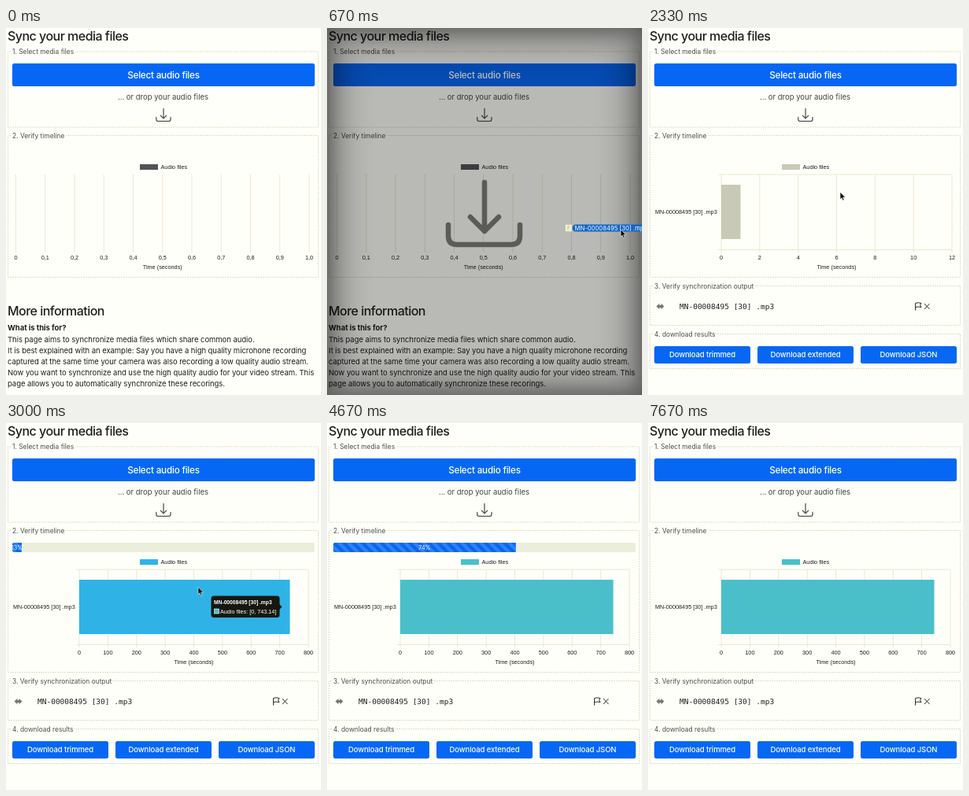
Recreate the animation shown at these times as an HTML page. Size 400 px wide and 466 px high, loop 8 s.

```html
<!DOCTYPE html>
<html lang="en">
<head>
<meta charset="utf-8">
<title>Sync your media files</title>
<style>
  html, body { margin: 0; width: 100%; height: 100%; overflow: hidden; background: #fffffa; }
  svg { display: block; width: 400px; height: 466px; font-family: Inter, sans-serif; fill: #1e1e1c; }
  text { white-space: pre; }
  .h { font-size: 16px; font-weight: 500; letter-spacing: -.52px; }
  .p { font-size: 9.5px; letter-spacing: -.05px; }
  .b { font-weight: 700; }
  .l { font-size: 8.4px; fill: #4c4c48; }
  .c { font: 7.3px "Liberation Sans", Arial, sans-serif; }
  .m { font: 9.5px "DejaVu Sans Mono", monospace; }
  .w { fill: #fff; }
  .line { fill: none; stroke: #2c2c28; }
</style>
</head>
<body>
<svg id="stage" viewBox="0 0 400 466"></svg>
<script>
const LOOP = 8000, STEP = 1000 / 3;
const FILE = 'MN-00008495 [30] .mp3';
const BLUE = '#0567f3', GRID = '#e9e9cc';
const INFO = [
  'This page aims to synchronize media files which share common audio.',
  'It is best explained with an example: Say you have a high quality microhone recording',
  'captured at the same time your camera was also recording a low quality audio stream.',
  'Now you want to synchronize and use the high quality audio for your video stream. This',
  'page allows you to automatically synchronize these recorings.'
];

const clamp = x => Math.max(0, Math.min(1, x));
const smooth = x => (x = clamp(x), x * x * (3 - 2 * x));
const outQuart = x => 1 - (1 - clamp(x)) ** 4;

const text = (x, y, s, cls, more = '') => `<text x="${x}" y="${y}" class="${cls}" ${more}>${s}</text>`;
const mid = (x, y, s, cls, more = '') => text(x, y, s, cls, 'text-anchor="middle" ' + more);
const rect = (x, y, w, h, fill, more = '') =>
  `<rect x="${x}" y="${y}" width="${w}" height="${h}" fill="${fill}" ${more}/>`;
const path = (d, more = '') => `<path d="${d}" ${more}/>`;

// Dashed box with its caption set into the top edge
const panel = (top, bottom, caption, gap) =>
  path(`M6 ${top}H2.5V${bottom}H396.5V${top}H${gap}`, 'fill="none" stroke="#dedec0" stroke-dasharray="2 1"') +
  text(8, top + 3, caption, 'l');

const button = (x, y, w, h, s, size, space) =>
  rect(x, y, w, h, BLUE, 'rx="2.5"') +
  mid(x + w / 2, y + h / 2 + size * .36, s, 'w', `font-size="${size}" font-weight="500" letter-spacing="${space}"`);

const tray = (x, y, scale, color) =>
  `<g transform="translate(${x} ${y}) scale(${scale})" fill="none" stroke="${color}" stroke-width="6.5" stroke-linecap="round" stroke-linejoin="round">` +
  path('M-46 14V28Q-46 39-35 39H34Q45 39 45 28V14M0-40V22M-18 4 0 22 18 4') + '</g>';

const cursor = (x, y) =>
  path(`M${x} ${y}v9l2-1.8 1.5 3.4 1.6-.7-1.5-3.2 2.9-.2z`, 'fill="#000" stroke="#fff" stroke-width=".6"');

function chart(left, right, labels, swatch, bar) {
  const gap = (right - left) / (labels.length - 1);
  let out = rect(170, 173, 23, 7, swatch) + text(196.5, 178.7, 'Audio files', 'c');
  labels.forEach((s, i) => {
    const x = left + gap * i;
    out += path(`M${x} 186V285`, `stroke="${GRID}"`) + mid(x, 294, s, 'c');
  });
  out += mid((left + right) / 2, 306, 'Time (seconds)', 'c');
  if (bar) {
    out += path(`M${left - 4} 186H${right}M${left - 4} 281.5H${right}`, `stroke="${GRID}"`) +
      rect(left, 199, bar - left, 69, swatch) + text(9, 235.5, FILE, 'c');
  }
  return out;
}

function progress(t) {
  const second = t >= 4250;
  const w = 50 * smooth((t - 2808) / 600) + 234 * smooth((t - 4250) / 600);
  const shift = 8 - 12 * (t % 1000) / 1000;
  return `<defs><pattern id="stripes" x="${shift}" y="152" width="12" height="12" patternUnits="userSpaceOnUse">` +
    path('M0 12H6L0 6ZM0 0H6L12 6V12Z', 'fill="#fff" fill-opacity=".17"') +
    '</pattern><clipPath id="fill">' + rect(8, 152, w, 12, '#000') + '</clipPath></defs>' +
    rect(8, 152, 384, 12, '#ebeeda', 'rx="2"') +
    '<g clip-path="url(#fill)">' + rect(8, 152, 384, 12, BLUE, 'rx="2"') +
    rect(8, 152, 384, 12, 'url(#stripes)') +
    mid(8 + w / 2, 160.6, second ? '74%' : '13%', 'w', 'font-size="7.1"') + '</g>';
}

const tooltip = dx => `<g transform="translate(${dx} 0)">` +
  rect(260.5, 219.5, 87, 27.5, '#16180f', 'rx="3.5"') + path('M347 230l3.5 3.5-3.5 3.5z', 'fill="#16180f"') +
  text(264, 229.5, FILE, 'c w', 'style="font-size:6.7px;font-weight:700"') +
  rect(264.5, 236, 6, 6, '#4bbfc8', 'stroke="#fff" stroke-width=".6"') +
  text(272, 242, 'Audio files: [0, 743.14]', 'c w', 'style="font-size:7.2px"') + '</g>';

const results = () =>
  panel(327.5, 377.5, '3. Verify synchronization output', 134) +
  path('M10.5 353.5l4-3.7v2.2h2v-2.2l4 3.7-4 3.7v-2.2h-2v2.2z', 'fill="#77776c"') +
  text(40, 356.5, FILE, 'm') +
  path('M339.5 358.5V349.5Q343 348 347 349.5L345.5 352 347 354.5Q343 353.5 339.5 354.5M351 350l6.5 7M357.5 350l-6.5 7', 'class="line"') +
  panel(388.5, 432.5, '4. download results', 86) +
  ['Download trimmed', 'Download extended', 'Download JSON']
    .map((s, i) => button(8 + 131 * i, 404, 122, 22, s, 9.5, -.1)).join('');

const info = () => text(2, 365, 'More information', 'h') +
  text(2, 384, 'What is this for?', 'p b') +
  INFO.map((s, i) => text(2, 398.5 + 14.2 * i, s, 'p')).join('');

// Soft shadow running inward from all four sides
const edge = (width, blur, alpha) =>
  rect(-10, -10, 420, 486, 'none', `stroke="#000" stroke-width="${width}" opacity="${alpha}" style="filter:blur(${blur}px)"`);

function dropZone(t) {
  const k = smooth((t - 667) / 1233), x = 312.5 - 129.5 * k, y = 249.5 - 47.5 * k;
  return rect(0, 0, 400, 466, '#040404', 'opacity=".28"') +
    edge(70, 18, .22) + edge(28, 12, .38) +
    tray(200, 236, 1, '#5a5d57') +
    rect(x - 10, y, 8.5, 9, '#f1efd4', 'stroke="#c4bf98" stroke-width=".5"') +
    path(`M${x - 6.5} ${y + 6.5}v-4l2 .6`, 'fill="none" stroke="#b0a878" stroke-width=".7"') +
    rect(x - 1, y, 101, 9, '#1266c8', 'rx="4.5"') +
    text(x + 2, y + 7.2, FILE, 'w', 'font-size="7.7"') +
    cursor(x + 60.5, y + 6.5);
}

function draw(t) {
  const loaded = t > 2300, decoded = t > 2600, hover = t < 4300;
  const drag = t > 600 && !loaded;
  let out = text(2, 15.5, 'Sync your media files', 'h') +
    panel(30, 126, '1. Select media files', 88) +
    button(8, 45, 384, 29, 'Select audio files', 11.7, -.22) +
    mid(199.5, 91, '... or drop your audio files', '', 'font-size="9.5" fill="#44443e"') +
    tray(200, 110.5, .2, '#55554e') +
    panel(136.5, 316.5, '2. Verify timeline', 76);

  if (!loaded) {
    const ticks = Array.from({ length: 11 }, (_, i) => i ? (i / 10).toFixed(1).replace('.', ',') : '0');
    out += chart(12.5, 385, ticks, '#535355') + info();
  } else if (!decoded) {
    out += chart(93, 386, [0, 2, 4, 6, 8, 10, 12], '#c9c9b8', 117.5);
  } else {
    const ticks = Array.from({ length: 9 }, (_, i) => i * 100);
    const end = 117.5 + 246 * outQuart((t - 2333) / 1000);
    out += chart(93, 384, ticks, hover ? '#2fb3e6' : '#4bbfc9', end);
  }
  if (decoded && t < 7600) out += progress(t);
  if (loaded) out += results();
  if (t > 2900 && hover) out += tooltip(10 * smooth((t - 3000) / 300));
  if (loaded && hover) out += cursor(244, 208.5);
  if (drag) out += dropZone(t);
  return out;
}

const stage = document.getElementById('stage');
let last = -1;
function tick(now) {
  const n = Math.floor((now % LOOP + 4) / STEP) % 24;
  if (n !== last) stage.innerHTML = draw((last = n) * STEP);
  requestAnimationFrame(tick);
}
tick(performance.now());
</script>
</body>
</html>
```
